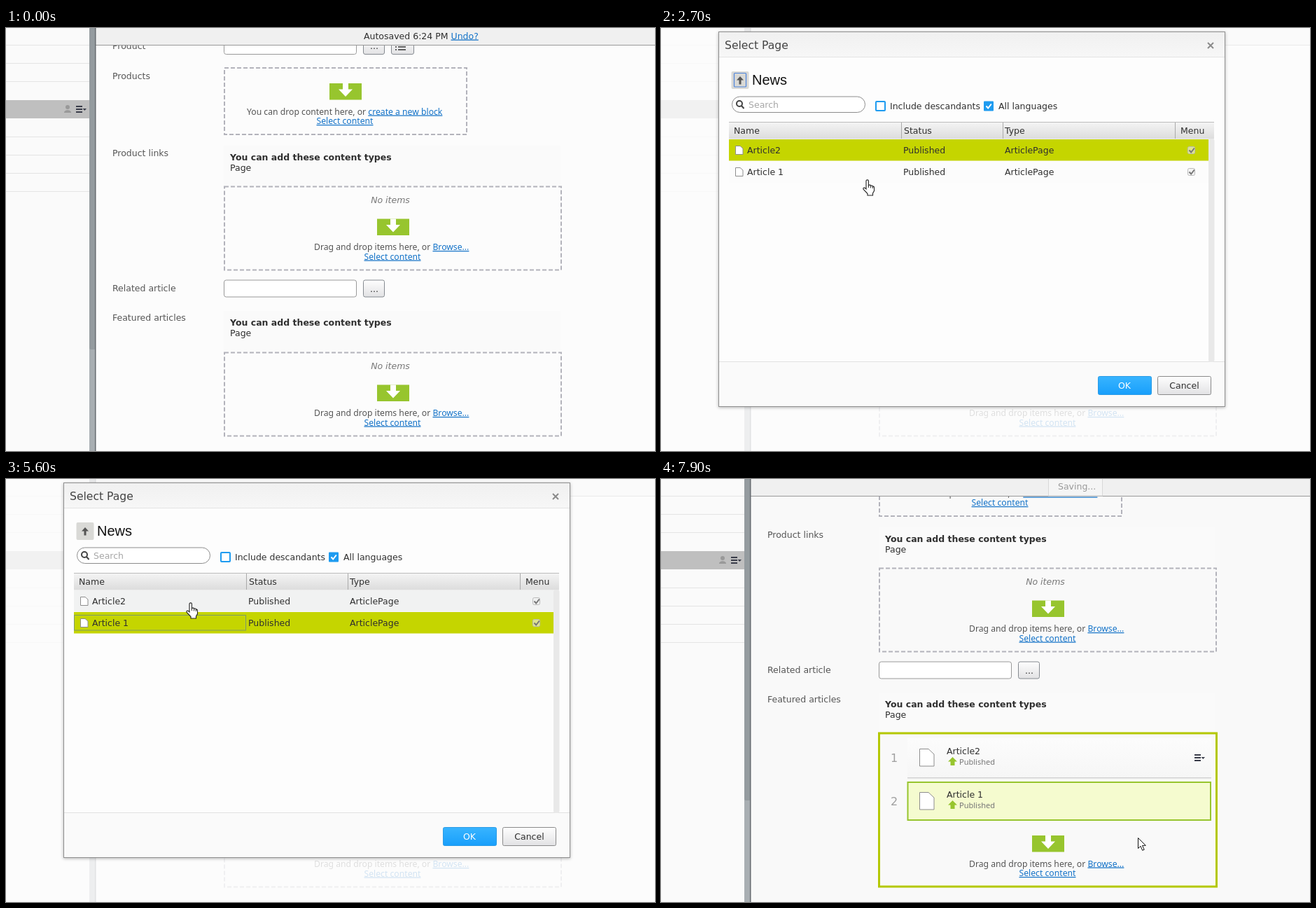
An HTML page for the animation above (8000 ms loop, 927 by 604 pixels).

```html
<!DOCTYPE html>
<html lang="en">
<head>
<meta charset="utf-8">
<title>Select page dialog</title>
<style>
html, body { margin: 0; width: 100%; height: 100%; overflow: hidden; background: #fcfcfc; }
svg { display: block; }
text { font: 12.5px "DejaVu Sans", Verdana, sans-serif; fill: #2f2f2f; white-space: pre; }
.label { fill: #555; }
.head { font-weight: bold; }
.none { font-style: italic; fill: #777; text-anchor: middle; }
.hint { font: 12.2px "Noto Sans", sans-serif; fill: #555; }
.link { fill: #1473c8; text-decoration: underline; }
.mid { text-anchor: middle; }
.title { font-size: 15.6px; fill: #444; }
.news { font: 20px "Liberation Sans", Arial, sans-serif; fill: #111; }
.num { font-size: 16px; fill: #a0a0a0; text-anchor: middle; }
.sub { font: 11px "Noto Sans", sans-serif; fill: #777; }
</style>
</head>
<body>
<svg id="stage" width="927" height="604" viewBox="0 0 927 604"></svg>
<script>
const LOOP = 8000, STEP = 100;

const rect = (x, y, w, h, fill, more = '') =>
  `<rect x="${x}" y="${y}" width="${w}" height="${h}" fill="${fill}" ${more}/>`;
const text = (x, y, str, cls = '') => `<text x="${x}" y="${y}" class="${cls}">${str}</text>`;
const path = (d, fill, more = '') => `<path d="${d}" fill="${fill}" ${more}/>`;
const group = (id, body, more = '') => `<g id="${id}" ${more}>${body}</g>`;
const at = (x, y, body) => `<g transform="translate(${x} ${y})">${body}</g>`;
const link = str => `<tspan class="link">${str}</tspan>`;
const gradient = (id, a, b) =>
  `<linearGradient id="${id}" x2="0" y2="1"><stop stop-color="${a}"/><stop offset="1" stop-color="${b}"/></linearGradient>`;

// Small icons
const dropIcon = (x, y) => at(x, y,
  rect(0, 0, 46, 23.5, '#97c52e') + path('M19 0h8v8.500h6L23 19 13 8.500h6z', '#fff'));
const menuIcon = (x, y) => at(x, y,
  path('M0 1h9M0 5h9M0 9h9', 'none', 'stroke="#3a3d4a" stroke-width="2"') +
  path('M9.500 4h5.500l-2.700 3z', '#3a3d4a'));
const sheet = (x, y, w, h, fold) => at(x, y,
  path(`M.5.5H${w - fold}L${w} ${fold}V${h}H.5zM${w - fold}.5V${fold}H${w}`, '#fff', 'stroke="#8d8d8d"'));
const tick = (x, y, color, w) =>
  path(`M${x} ${y}l2.700 3 4.600-6`, 'none', `stroke="${color}" stroke-width="${w}"`);

// Form parts
const dashed = (x, y, w, h) => rect(x, y, w, h, 'none', 'stroke="#b3b3bb" stroke-width="2" stroke-dasharray="6 3"');
const input = (x, y) => rect(x + .5, y + .5, 189, 24, '#fff', 'rx="3" stroke="#999"');
const button = (x, y, w) => rect(x + .5, y + .5, w, 24, 'url(#btn)', 'rx="2.5" stroke="#858a90"');
const dots = y => button(510, y, 30) + text(526, y + 17, '...', 'mid');
const dropHint = y => dropIcon(530, y) +
  text(440, y + 44.5, 'Drag and drop items here, or ' + link('Browse...'), 'hint') +
  text(552, y + 58, link('Select content'), 'hint mid');
const typesPanel = (y, bg) => rect(311, y, 481, 58, bg) +
  text(320, y + 20.5, 'You can add these content types', 'head') + text(320, y + 36, 'Page');
const emptyZone = y => dashed(312, y, 481, 119) + text(549, y + 23, 'No items', 'none') + dropHint(y + 46);

const form = text(152, 30, 'Product', 'label') + input(311, 13) + dots(13) +
  button(550, 13, 32) +
  path('M556 23h2m2 0h11M556 27h2m2 0h11M556 31h2m2 0h11', 'none', 'stroke="#333" stroke-width="1.500"') +
  text(152, 72.5, 'Products', 'label') + dashed(312, 57, 346, 95) + dropIcon(462, 79) +
  text(344, 123.5, 'You can drop content here, or ' + link('create a new block'), 'hint') +
  text(484, 137, link('Select content'), 'hint mid') +
  text(152, 182.5, 'Product links', 'label') + typesPanel(168, '#fafafa') + emptyZone(226.5) +
  text(152, 375.5, 'Related article', 'label') + input(311, 359.5) + dots(359.5) +
  text(152, 418, 'Featured articles', 'label') + typesPanel(404, '#fafafa');

const item = (n, y, name) => text(333, y + 5.5, n, 'num') + sheet(369, y - 13, 21, 25, 8) +
  text(408, y - 5, name) +
  path(`M416.500 ${y - 1}l6.500 6.500h-3.500v5.500h-6v-5.500h-3.500z`, '#97c52e') +
  text(426, y + 10, 'Published', 'sub');
const hotZone = (y, h) => rect(311.5, y, 482, h, 'none', 'stroke="#b4c800" stroke-width="3"');

const before = form + group('empty', emptyZone(463.5)) + group('hot', hotZone(462.5, 119.5));
const after = at(0, -99, form) +
  rect(311, 363, 482, 219, '#f9f9f9') + hotZone(363, 219) +
  rect(352, 370, 434, 56, 'url(#card)') + rect(352, 426, 434, 1.5, '#d2d2d2') +
  item(1, 398, 'Article2') + menuIcon(762, 393) +
  rect(352.5, 433, 432.5, 54, '#f5fbcf', 'stroke="#97c52e" stroke-width="2"') + item(2, 460, 'Article 1') +
  dropHint(509);

const sidebar = rect(0, 0, 119, 604, '#fafafa') +
  [24, 50, 76, 155, 181, 207, 233].map(y => rect(0, y, 119, 1, '#e4e4e4')).join('') +
  rect(0, 103, 119, 26, '#bfbfbf') +
  '<circle cx="88" cy="113" r="3" fill="#999"/>' + path('M83 121c0-5 10-5 10 0z', '#999') +
  menuIcon(100, 111) +
  rect(119, 0, 9, 604, '#a8aeb2') + rect(119, 0, 9, 459, '#949b9f', 'rx="2"') + rect(127, 0, 1.5, 604, '#666b70');

const topBar = rect(128, 0, 799, 24, '#f0f0f0') + rect(128, 24, 799, 1, '#999') +
  group('autosaved', text(511, 15.5, 'Autosaved 6:24 PM ' + link('Undo?'))) +
  group('saving', rect(553.5, -2, 77, 26, '#f5f5f5', 'stroke="#d8d8d8"') +
    '<text x="567" y="15" style="fill:#999">Saving...</text>');

// Dialog
const row = (i, name) => {
  const y = 159 + i * 31;
  return rect(97, y, 685, 30.5, i ? '#fcfcfc' : '#f1f2f2') +
    rect(97, y, 685, 30.5, '#dfdfdf', `id="grey${i}"`) +
    rect(97, y, 685, 30.5, '#c5d500', `id="pick${i}"`) +
    rect(97.5, y + 4.5, 245, 21.5, 'none', `id="focus${i}" stroke="#7e9a6c"`) +
    sheet(106, y + 9, 11, 12.5, 4) + text(123, y + 20, name) +
    text(346, y + 20, 'Published') + text(491, y + 20, 'ArticlePage') +
    rect(752.5, y + 10.5, 10, 10, '#eee', 'rx="2" stroke="#bbb" fill-opacity=".6"') +
    tick(754.5, y + 15.5, '#777', 2);
};
const dialog =
  rect(82.5, 5.5, 723, 535, '#fdfdfd', 'stroke="#909090" filter="url(#shadow)"') +
  rect(83, 6, 722, 35, 'url(#bar)') + rect(83, 41, 722, 1, '#e4e4e4') +
  rect(83, 477, 722, 63, '#fafafa') + rect(83, 476, 722, 1, '#e2e2e2') +
  text(91, 30, 'Select Page', 'title') +
  path('M781 21l8 8m0-8l-8 8', 'none', 'stroke="#8a8a8a" stroke-width="2"') +
  rect(100.5, 62, 25, 25, '#d9d9d6', 'rx="2"') +
  path('M113 69l5 5.500h-3.500v6h-3v-6H108z', '#555') +
  rect(104.5, 64.5, 17, 19.5, 'none', 'id="ring" rx="1" stroke="#4f86dc" stroke-width="1.200"') +
  text(130, 81, 'News', 'news') +
  rect(101.5, 98, 190, 22.5, '#fff', 'rx="11.2" stroke="#8c8c8c"') +
  path('M116 108a4 4 0 1 0-8 0 4 4 0 1 0 8 0M115 111l3.500 4', 'none', 'stroke="#444" stroke-width="2"') +
  '<text x="125" y="114" style="fill:#a6a6a6">Search</text>' +
  rect(307, 105, 13, 13, '#fff', 'rx="1" stroke="#1e9bf0" stroke-width="2"') +
  text(327, 115.5, 'Include descandants') +
  rect(461, 104.5, 14, 14, '#1e9bf0', 'rx="1"') + tick(464.5, 111.5, '#fff', 2) +
  text(482, 115.5, 'All languages') +
  rect(97, 135, 693, 23.5, 'url(#bar2)') + rect(97, 134, 693, 1, '#bcbcbc') +
  [343, 488, 734].map(x => rect(x, 135, 1, 23, '#aaa')).join('') +
  text(104, 151, 'Name') + text(347, 151, 'Status') + text(491, 151, 'Type') + text(742, 151, 'Menu') +
  row(0, 'Article2') + row(1, 'Article 1') +
  rect(782, 158, 8.5, 319, '#e9e9e9', 'rx="3"') +
  rect(624.5, 497.5, 76, 26, 'url(#ok)', 'rx="2" stroke="#2a9be6"') +
  '<text x="662" y="515" class="mid" style="fill:#fff">OK</text>' +
  rect(709.5, 497.5, 76, 26, 'url(#btn)', 'rx="2" stroke="#8a8a8a"') + text(747.5, 515, 'Cancel', 'mid');

const cursors =
  group('arrow', path('M.5.500V15.500L4 12.200 6.700 18.300 9.200 17.200 6.500 11.300H11.300z', '#fff', 'stroke="#111"')) +
  group('hand',
    path('M5 14V2.200C5 .400 8.400.400 8.400 2.200V8.600C10 7.600 11.400 8.200 11.600 9.200 13 8.600 14.200 9.200 14.400 10.200 15.800 9.800 16.500 10.800 16.500 12V16.500L14.500 20V23H7V20.500L1 14.200C.2 12.600 2.400 11.400 3.600 12.600Z', '#fff', 'stroke="#222" stroke-width="1.100"') +
    path('M8.400 8v4M11.600 9v3.500M14.400 10v3', 'none', 'stroke="#222"'));

document.getElementById('stage').innerHTML = '<defs>' +
  gradient('btn', '#fefefe', '#e2e2e4') + gradient('bar', '#f0f0f0', '#f7f7f7') +
  gradient('bar2', '#f4f4f4', '#dcdcdc') + gradient('ok', '#38b4ff', '#189ffb') + gradient('card', '#fcfcfc', '#f6f6f6') +
  '<filter id="shadow"><feDropShadow dx="0" dy="1" stdDeviation="2" flood-opacity=".3"/></filter></defs>' +
  rect(0, 0, 927, 604, '#fcfcfc') + group('before', before) +
  group('after', rect(128, 0, 799, 604, '#f9f9f9') + after) +
  topBar + sidebar + rect(0, 0, 927, 604, '#fdfdfd', 'id="veil"') + group('dialog', dialog) + cursors;

// Pointer moves: start, end, x, y, shape
const moves = [
  [100, 100, 860, 105, 'arrow'], [300, 400, 577, 531, 'arrow'], [700, 800, 556, 574, 'arrow'],
  [1100, 1200, 547, 565, 'hand'], [1500, 1500, 553, 566, 'arrow'], [2000, 2100, 366, 272, 'arrow'],
  [2300, 2400, 350, 244, 'arrow'], [2600, 2700, 288, 216, 'hand'], [3200, 3400, 241, 202, 'hand'],
  [4100, 4100, 275, 219, 'hand'], [4400, 4700, 301, 195, 'hand'], [4900, 5100, 259, 170, 'hand'],
  [5500, 5600, 257, 176, 'hand'], [6200, 6500, 791, 574, 'arrow'], [6600, 6700, 773, 542, 'arrow'],
  [6900, 7300, 675, 511, 'hand'], [7700, 7700, 681, 512, 'arrow']
];

// Opacity over time: [time, value], linear between the points
const tracks = {
  veil: [[1600, 0], [1700, .25], [1900, .7], [2100, .82], [7600, .82], [7900, 0]],
  dialog: [[1600, 0], [1700, .1], [1900, .45], [2100, 1], [7600, 1], [7700, .7], [7900, 0]],
  grey0: [[1900, 1], [2100, 0]],
  grey1: [[0, 0]],
  pick0: [[1900, 0], [2100, 1], [3300, 1], [3600, 0], [5600, 0], [5700, 1]],
  pick1: [[3300, 0], [3600, 1]]
};

// Spans of time in which a part is shown
const spans = {
  before: [0, 7800], after: [7800, LOOP], autosaved: [0, 7800], saving: [7800, LOOP],
  hot: [1700, 2100], ring: [2600, 3400], focus1: [3400, 5700], focus0: [5700, 7300]
};

const $ = id => document.getElementById(id);
const show = (id, on) => $(id).style.display = on ? '' : 'none';

function level(points, t) {
  const next = points.findIndex(p => p[0] > t);
  if (next === 0) return points[0][1];
  if (next < 0) return points[points.length - 1][1];
  const [a, u] = points[next - 1], [b, v] = points[next];
  return u + (v - u) * (t - a) / (b - a);
}

function pointer(t) {
  const i = moves.findLastIndex(m => m[0] <= t);
  if (i < 0) return null;
  const [start, end, x, y, shape] = moves[i], from = moves[i - 1] || moves[i];
  const p = Math.min(1, (t - start + STEP) / (end - start + STEP));
  return { x: Math.round(from[2] + (x - from[2]) * p), y: Math.round(from[3] + (y - from[3]) * p), shape };
}

function draw(t) {
  for (const id in tracks) $(id).style.opacity = level(tracks[id], t);
  for (const id in spans) show(id, t >= spans[id][0] && t < spans[id][1]);
  show('empty', t < 1700 || t >= 2100);
  const p = pointer(t);
  for (const shape of ['arrow', 'hand']) {
    const on = p && p.shape === shape;
    show(shape, on);
    if (on) $(shape).setAttribute('transform', `translate(${p.x} ${p.y})`);
  }
  // The hint stays readable inside the highlighted zone
  if (t >= 1700 && t < 2100) show('empty', true);
}

function tick100() {
  draw(Math.floor(performance.now() % LOOP / STEP) * STEP);
  requestAnimationFrame(tick100);
}
tick100();
</script>
</body>
</html>
```
